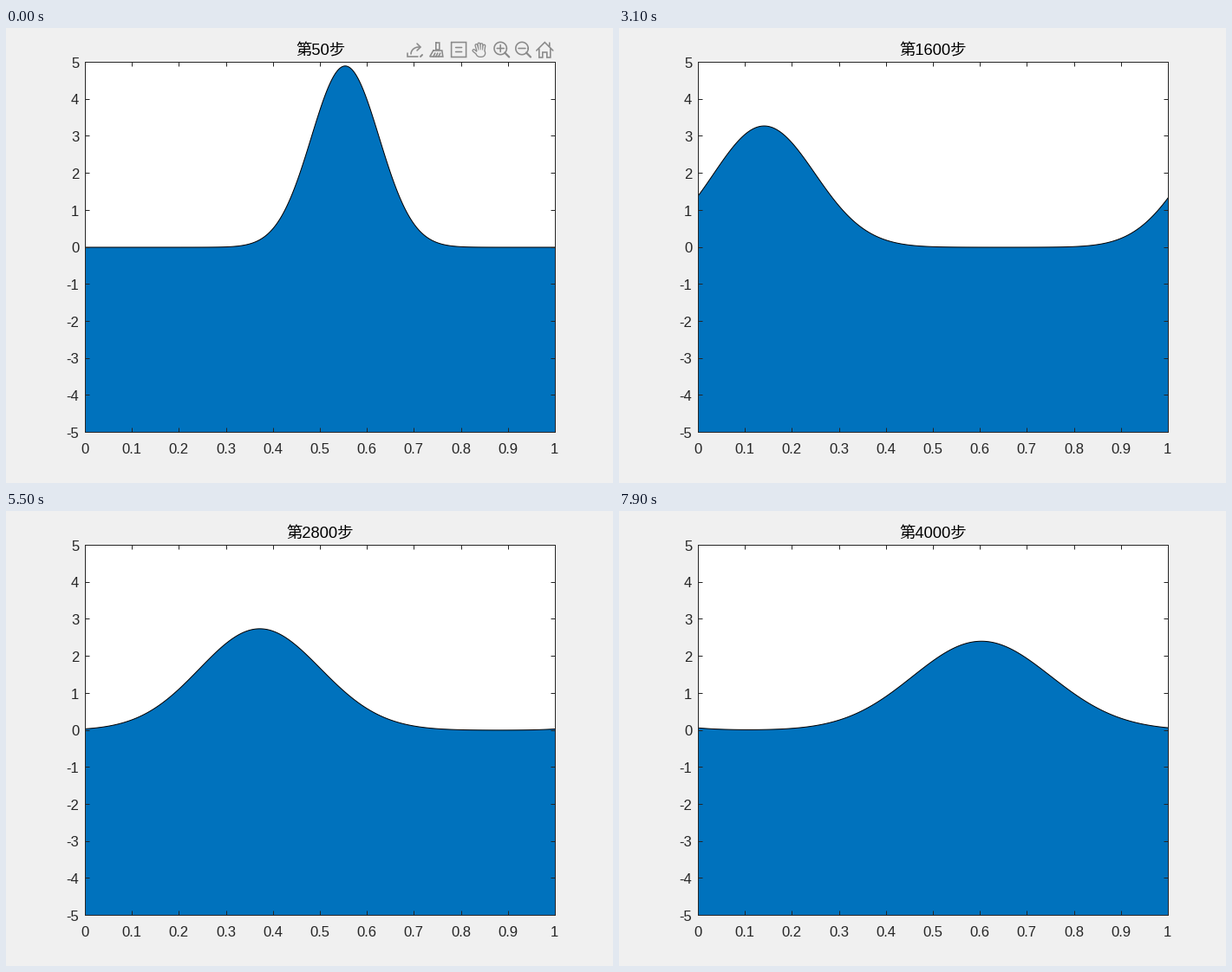
These frames come from a looping animation (700 px wide and 525 px high, 8 s). A matplotlib script:

```python
import numpy as np
import matplotlib.pyplot as plt
from matplotlib.animation import FuncAnimation
from matplotlib.patches import Polygon

W, H, DPI = 700, 525, 100
FRAMES, INTERVAL = 80, 100
LEFT, RIGHT, TOP, BOTTOM = 91.5, 633.5, 39.5, 466.5
INK, BLUE, GREY, BACK = "#262626", "#0072bd", "#8a8a8a", "#f0f0f0"
FONTS = ["Liberation Sans", "Noto Sans CJK JP"]
PX = 72 / DPI

fig = plt.figure(figsize=(W / DPI, H / DPI), dpi=DPI, facecolor=BACK)
ax = fig.add_axes([0, 0, 1, 1])
ax.set(xlim=(0, W), ylim=(H, 0))
ax.axis("off")

# Advected pulse: implicit upwind scheme on a periodic grid, solved per mode
POINTS, SPEED = 334, 0.0010287
grid = np.linspace(0, 1, POINTS)
courant = SPEED * (POINTS - 1)
shift = np.exp(-2j * np.pi * np.arange(POINTS // 2 + 1) / POINTS)
gain = 1 / (1 + courant * (1 - shift))
pulse = np.fft.rfft(5 * np.exp(-100 * (grid - 0.5016) ** 2))


def wave(step):
    return np.fft.irfft(pulse * gain ** step, POINTS)


def to_x(v):
    return LEFT + (RIGHT - LEFT) * v


def to_y(v):
    return TOP + (BOTTOM - TOP) * (5 - v) / 10


def outline(step):
    xs = np.concatenate(([0], grid, [1]))
    ys = np.concatenate(([-5], wave(step), [-5]))
    return np.column_stack((to_x(xs), to_y(ys)))


def line(xs, ys, color=INK, width=1.0, cap="butt", z=4):
    return ax.plot(xs, ys, color=color, lw=width * PX, zorder=z, snap=False,
                   solid_capstyle=cap, solid_joinstyle="miter")[0]


def label(x, y, text, size, color, ha):
    return ax.text(x, y, text, fontsize=size * PX, color=color, ha=ha,
                   va="baseline", family=FONTS, zorder=6)


def draw_axes():
    xs = [LEFT, RIGHT, RIGHT, LEFT, LEFT]
    ys = [TOP, TOP, BOTTOM, BOTTOM, TOP]
    ax.fill(xs, ys, color="white", lw=0, zorder=1)
    line(xs, ys, cap="projecting")
    for i in range(11):
        x, y = to_x(i / 10), to_y(i - 5)
        # ticks sit on whole pixels
        tx, ty = np.floor(x) + 0.5, np.floor(y) + 0.5
        for edge, inward in ((TOP, 5), (BOTTOM, -5)):
            line([tx, tx], [edge, edge + inward])
        for edge, inward in ((LEFT, 5), (RIGHT, -5)):
            line([edge, edge + inward], [ty, ty])
        label(x - 0.7, 491, f"{i / 10:g}", 16.67, INK, "center")
        label(84.2, y + 6.3, str(i - 5), 16.67, INK, "right")


def draw_toolbar():
    """Icons are spaced evenly and drawn around their own centres."""
    parts = []

    def stroke(cx, xs, ys, width=1.6, color=GREY, cap="round"):
        parts.append(line(cx + np.array(xs), 25 + np.array(ys), color, width, cap, 7))

    def box(cx, x0, x1, y0, y1):
        stroke(cx, [x0, x1, x1, x0, x0], [y0, y0, y1, y1, y0])

    share, brush, tip, hand, zoom_in, zoom_out, home = 472 + 24.8 * np.arange(7)
    turn = np.linspace(0, 2 * np.pi, 40)

    arc = turn[:11]
    stroke(share, 4 - 9 * np.cos(arc), 5 - 8 * np.sin(arc))
    stroke(share, [2, 6, 2], [-7, -3, 1])
    stroke(share, [-9, -9, 3], [4, 8, 8])
    stroke(share, [6, 8], [8, 6], 2)

    box(brush, -1, 3, -8, 0)
    stroke(brush, [-4, 6, 7, -8, -4], [1, 1, 8, 8, 1])
    for k in range(3):
        stroke(brush, [k * 3 - 2, k * 3 - 4], [4, 8])

    box(tip, -8, 9, -8.5, 8.5)
    for y in (-2.5, 2.5):
        stroke(tip, [-3, 4], [y, y])

    # grey shape with a lighter core leaves an outlined hand
    for color, trim in ((GREY, 0), (BACK, 2.6)):
        for k in range(4):
            stroke(hand, [k * 3 - 4, k * 2 - 2], [abs(k - 1.3) * 1.5 - 7, 2],
                   4 - trim, color)
        stroke(hand, [-7, -2], [1, 5], 4 - trim, color)
        stroke(hand, [0, 2], [4, 4], 10 - trim, color)

    for cx in (zoom_in, zoom_out):
        stroke(cx, 7.2 * np.cos(turn) - 1, 7.2 * np.sin(turn) - 1.5)
        stroke(cx, [-5, 3], [-1.5, -1.5])
        stroke(cx, [4, 9], [3.5, 8.5], 2.2)
    stroke(zoom_in, [-1, -1], [-5.5, 2.5])

    stroke(home, [-9, 0.5, 10], [1, -8.5, 1])
    stroke(home, [-6, -6, -2, -2, 3, 3, 7, 7], [-1, 9, 9, 3, 3, 9, 9, -1])
    stroke(home, [6, 6], [-8, -4])
    return parts


draw_axes()
toolbar = draw_toolbar()
area = ax.add_patch(Polygon(outline(50), closed=True, fc=BLUE, ec="black",
                            lw=PX, zorder=3, snap=False))
title = label(362.5, 32, "", 18.33, "black", "center")


def update(i):
    step = 50 * (i + 1)
    area.set_xy(outline(step))
    title.set_text(f"第{step}步")
    for part in toolbar:
        part.set_visible(i == 0)
    return [area, title, *toolbar]


anim = FuncAnimation(fig, update, frames=FRAMES, interval=INTERVAL,
                     repeat=True, repeat_delay=0, blit=False)
plt.show()
```
